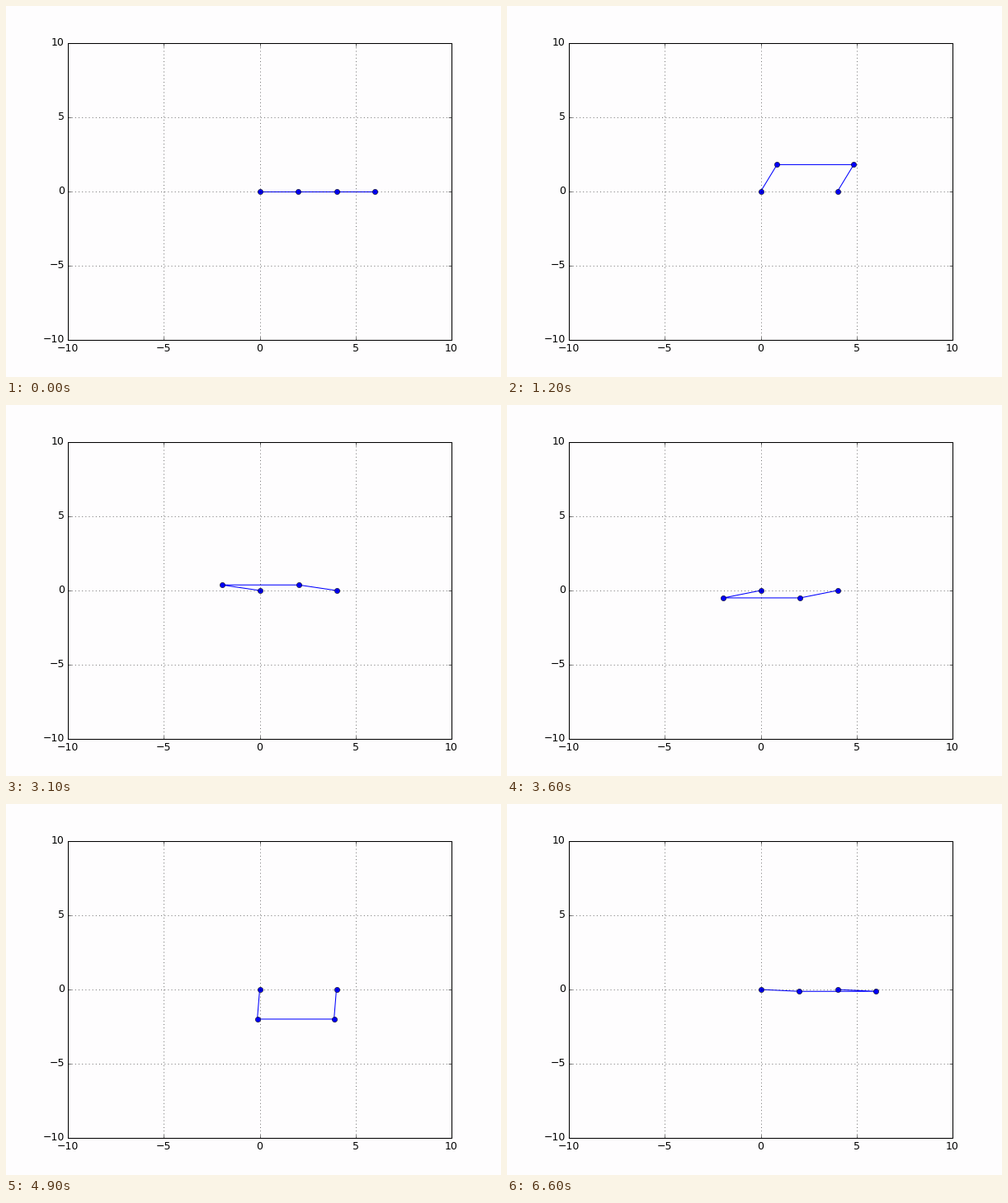
Animation of 600 by 450 pixels, one loop 6700 ms. Source, as a matplotlib script:

```python
import numpy as np
import matplotlib.pyplot as plt
from matplotlib.animation import FuncAnimation

FRAMES = 67
INTERVAL = 100
STEPS_PER_TURN = 100
CRANK = 2.0
BASE = 4.0
PAPER = "#fefdfe"

plt.style.use("classic")
plt.rcParams.update({
    "font.family": "DejaVu Sans",
    "font.size": 12,
    "axes.unicode_minus": True,
    "savefig.dpi": "figure",
    "savefig.facecolor": "auto",
})

fig = plt.figure(figsize=(8, 6), dpi=75, facecolor=PAPER)
ax = fig.add_axes([0.125, 0.1, 0.775, 0.8], facecolor=PAPER)
ax.set(xlim=(-10, 10), ylim=(-10, 10),
       xticks=range(-10, 11, 5), yticks=range(-10, 11, 5))
ax.grid(True)

linkage, = ax.plot([], [], "o-", color="b", lw=1)


def joints(angle):
    """Corners of the parallelogram linkage for a crank angle."""
    x, y = CRANK * np.cos(angle), CRANK * np.sin(angle)
    return [0, x, BASE + x, BASE], [0, y, y, 0]


def update(i):
    # The crank advances by alternating double and single steps.
    step = (3 * i + 1) // 2
    linkage.set_data(*joints(2 * np.pi * step / STEPS_PER_TURN))
    return linkage,


anim = FuncAnimation(fig, update, frames=FRAMES, interval=INTERVAL,
                     repeat=True, repeat_delay=0, blit=False)
plt.show()
```
